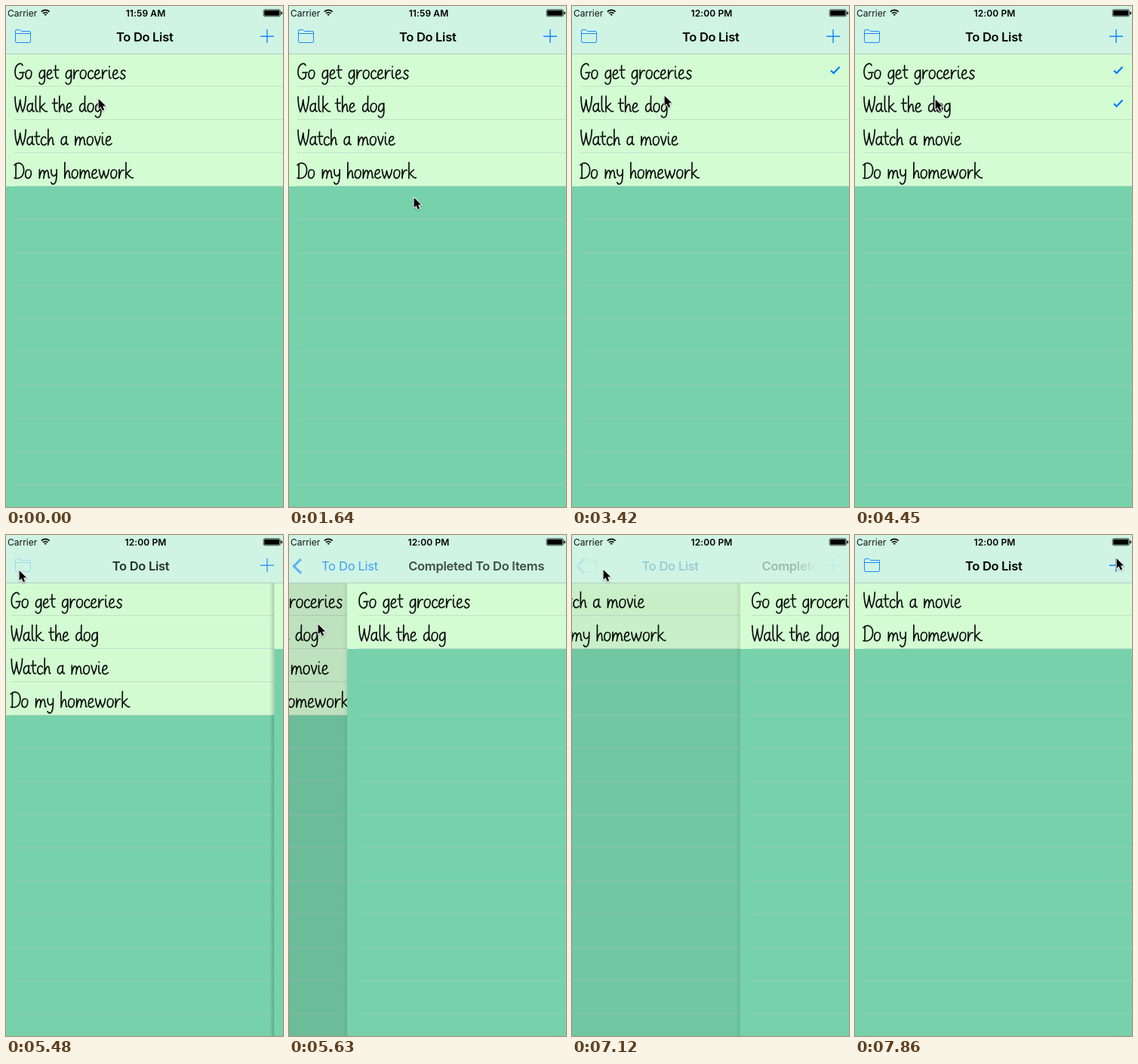
Animation of 367x664 px, one loop 8000 ms. Source, as an HTML page with a canvas:

```html
<!DOCTYPE html>
<html lang="en">
<head>
<meta charset="utf-8">
<title>To Do List</title>
<style>
html, body { margin: 0; width: 100%; height: 100%; overflow: hidden; background: #77d2ab; }
canvas { display: block; width: 367px; height: 664px; }
</style>
</head>
<body>
<canvas id="stage"></canvas>
<script>
const W = 367, H = 664, LOOP = 8000, STEP = LOOP / 54;
const ROW = 44, TOP = 63, SCREEN = 375, LEFT = -4;
const BLUE = '#007aff', GREEN = '#77d2ab', PALE = '#d3fcd3', BAR = '#cff4e4';

const canvas = document.getElementById('stage');
const ctx = canvas.getContext('2d');
const dpr = window.devicePixelRatio || 1;
canvas.width = W * dpr;
canvas.height = H * dpr;

// Handwriting: [advance, pen path], baseline at 0.
const bowl = 'M7.6-9.8C5.5-13 1-9.5 1-4.8S4.5 2 7.6-5';
const stem = 'M1.6-11.5L1.5 0';
const caps = {
  G: [14, 'M11-17.5C9-23 1-19 1-9S8 3 11.2-3L11.4-8M7-8L13.2-8.3'],
  W: [16, 'M1-20C1-13 2-5 4.2 0C6-5 7.4-11 7.8-16C8.1-10 9.3-4 11.1 0C13.8-6 15-12 15.3-20.5'],
  D: [13.6, 'M2.2-19.5L2 0M0-17.5C5-22.5 12.6-20 12.6-11S7 1.5 0-.3']
};
const round = {
  a: [10.5, bowl + 'L8-11.5C7.3-5 7.5 1 10.2-1'],
  c: [8.7, 'M7.3-9.2C6-13 1-10 1-5S5 1.8 8.2-2'],
  d: [10.5, bowl + 'L8-21C7.6-8 7.6 1 10-1'],
  e: [9.5, 'M1.2-5C5-5 7.8-8 6.8-10.3S2-12 1.2-6S4 2 8.6-2'],
  g: [10, bowl + 'L8-11.5C8.2-4 8.8 2 7.2 5S2 8.5 .8 5'],
  o: [10.3, 'M5.2-11.3C2-11.5 1-8 1-5S2.5 0 4.7 0S8.7-3 8.7-7S7.2-11.2 5.2-11.3']
};
const tall = {
  h: [10, 'M1.6-21L1.5 0C2-6 5-12 6.9-9.5S6.6 1 9.3-1'],
  i: [5.4, 'M1.7-11.3C1.4-6 1.3 1 4.2-1M2-16.3L1.9-15.6'],
  k: [10.2, 'M1.7-21L1.5 0M8-11.3L2-5.6C5.5-6.5 6 .5 11-.6'],
  l: [5.6, 'M1.8-21C1.6-10 1 1 4.4-.6'],
  t: [7.7, 'M2.8-17.5C2.6-9 1.8 1.5 6.5-1M0-11.3L6.8-11.6']
};
const arch = {
  m: [16, stem + 'C2-6 5-13 7.1-9.5S7-2 7 0C7.6-6 10.5-13 12.5-9.5S12.3 1 15-1'],
  r: [8.8, stem + 'C2-6 4-12 8-10.6'],
  s: [10, 'M7.8-10C5-13 1-9.5 3-7.2S9-4 7-1.3S2 .8 1-2'],
  v: [9, 'M.8-11.5L4.2 0C6-4 7.6-8 7.8-11.5'],
  w: [15.4, 'M.8-11.5C1.3-7 2.4-3 4 0C6-4 6.8-7 7-10C7.4-6 8.6-3 10 0C12.5-4 13.6-8 13.8-11.5'],
  y: [9.6, 'M1-11.5C.5-2 5-1 8-6M8.2-11.5C8.4-4 8.4 2 6.6 5.5S2 8 .9 5.5']
};
const glyphs = {};
for (const [ch, [adv, d]] of Object.entries({ ...caps, ...round, ...tall, ...arch })) {
  glyphs[ch] = { adv: adv + .1, pen: new Path2D(d) };
}

const icon = {
  folder: new Path2D('M12.5 46V33Q12.5 31.5 14 31.5H18.5L20.5 33.5H31Q32.5 33.5 32.5 35V46Q32.5 48.5 31 48.5H14Q12.5 48.5 12.5 46ZM12.5 36.5H32.5'),
  plus: new Path2D('M337 40.2H355M346 31V49'),
  chevron: new Path2D('M16 32L6.3 41.3L16 50.6'),
  check: new Path2D('M343 85.5L346.6 89L354.5 80.8'),
  arrow: new Path2D('M0 0V13.2L3 10.4L5.2 15.4L7.6 14.4L5.5 9.6H9.6Z')
};

const tasks = ['Go get groceries', 'Walk the dog', 'Watch a movie', 'Do my homework'];
const done = tasks.slice(0, 2), open = tasks.slice(2);

// Pointer stops: [step, x, y].
const route = [
  [0, 123, 123], [2, 87, 86], [5, 87, 86], [9, 176, 240], [11, 166, 254],
  [13, 145, 116], [16, 119, 90], [21, 119, 90], [23, 123, 119], [24, 123, 120],
  [25, 123, 120], [27, 128, 148], [29, 128, 148], [33, 44, 51], [34, 18, 47],
  [37, 18, 47], [40, 81, 261], [41, 82, 291], [43, 82, 291], [45, 42, 46],
  [48, 42, 46], [50, 190, 40], [52, 338, 27], [53, 347, 31]
];

function pointerAt(s) {
  const n = route.findIndex(p => p[0] >= s);
  if (n < 1) return route[0].slice(1);
  const [s0, x0, y0] = route[n - 1], [s1, x1, y1] = route[n];
  const k = (s - s0) / (s1 - s0);
  return [x0 + (x1 - x0) * k, y0 + (y1 - y0) * k];
}

// Critically damped page slide, 0 to 1.
function slide(s, start) {
  const x = Math.max(0, (s - start) * 2.57);
  const p = 1 - Math.exp(-x) * (1 + x);
  return p > .999 ? 1 : p;
}

function box(x, y, w, h, color) {
  ctx.fillStyle = color;
  ctx.fillRect(x, y, w, h);
}

function stroke(path, color, width, alpha = 1) {
  ctx.globalAlpha = alpha;
  ctx.strokeStyle = color;
  ctx.lineWidth = width;
  ctx.stroke(path);
  ctx.globalAlpha = 1;
}

function label(str, x, y, size, weight, color, align = 'left', alpha = 1, spacing = 0) {
  ctx.globalAlpha = alpha;
  ctx.font = `${weight} ${size}px Inter, Roboto, sans-serif`;
  ctx.letterSpacing = spacing + 'px';
  ctx.textAlign = align;
  ctx.fillStyle = color;
  ctx.fillText(str, x, y);
  ctx.globalAlpha = 1;
}

function write(str, x, y) {
  ctx.save();
  ctx.translate(x, y);
  ctx.lineCap = ctx.lineJoin = 'round';
  for (const ch of str) {
    const g = glyphs[ch];
    if (g) stroke(g.pen, '#0a0f0b', 1.7);
    ctx.translate(g ? g.adv : 7.7, 0);
  }
  ctx.restore();
}

function page(left, rows, checks = 0, glow = []) {
  ctx.save();
  ctx.translate(left - LEFT, 0);
  box(LEFT, TOP, SCREEN, H - TOP, GREEN);
  box(LEFT, TOP, SCREEN, ROW * rows.length, PALE);
  rows.forEach((str, i) => {
    const y = TOP + ROW * i;
    if (glow[i]) box(LEFT, y, SCREEN, ROW, `rgba(217,217,217,${glow[i]})`);
    write(str, 11, y + 33.3);
    if (i < checks) {
      ctx.save();
      ctx.translate(0, ROW * i);
      stroke(icon.check, BLUE, 2.2);
      ctx.restore();
    }
  });
  for (let y = TOP + ROW - 1, i = 1; y < H; y += ROW, i++) {
    box(11, y, SCREEN - 15, 1, i <= rows.length ? '#c6dfca' : '#9acbb7');
  }
  ctx.restore();
}

function statusBar(clock) {
  label('Carrier', 2, 13.5, 12, 400, '#111');
  label(clock, 185, 13.5, 12, 600, '#000', 'center', 1, .1);
  ctx.strokeStyle = ctx.fillStyle = '#000';
  ctx.lineWidth = 1.7;
  for (const r of [4.5, 7.6]) {
    ctx.beginPath();
    ctx.arc(52.2, 13, r, -Math.PI * .75, -Math.PI * .25);
    ctx.stroke();
  }
  ctx.beginPath();
  ctx.moveTo(52.2, 13);
  ctx.arc(52.2, 13, 2.3, -Math.PI * .75, -Math.PI * .25);
  ctx.fill();
  ctx.lineWidth = .7;
  ctx.beginPath();
  ctx.roundRect(341.2, 4.8, 22.2, 9, 1.8);
  ctx.stroke();
  ctx.beginPath();
  ctx.roundRect(342.2, 5.8, 20.2, 7, 1);
  ctx.roundRect(364.4, 7.6, 1.6, 3.6, .8);
  ctx.fill();
}

// q: 0 on the main list, 1 on the completed list.
function navBar(q, folderAlpha, backAlpha) {
  const old = (1 - q) ** 5, fresh = q ** 1.5;
  const shift = -122 * (q + .47 * q * q * (1 - q));
  const bold = [16.5, 600], y = 47;
  box(0, 0, W, TOP, BAR);
  box(0, TOP, W, 1, '#aecfbf');
  stroke(icon.folder, '#1789fc', 1, old * folderAlpha);
  stroke(icon.plus, '#1285fc', 1.4, old);
  label('To Do List', 183.7 + shift, y, ...bold, '#000', 'center', old, -.3);
  if (!q) return;
  ctx.lineCap = 'butt';
  stroke(icon.chevron, BLUE, 3, q ** 2.5 * backAlpha);
  label('To Do List', 183.7 + shift, y, 16.5, 400, BLUE, 'center', fresh * backAlpha, -.3);
  let ink = '#000';
  if (q < .75) {
    ink = ctx.createLinearGradient(292, 0, 326, 0);
    ink.addColorStop(0, 'rgba(0,0,0,1)');
    ink.addColorStop(1, 'rgba(0,0,0,0)');
  }
  label('Completed To Do Items', 106.3 + 240 * (1 - q), y, ...bold, ink, 'left', fresh, -.25);
}

function pages(s, q) {
  const main = s < 41 ? tasks : open;
  const checks = s < 22 || s >= 37 ? 0 : s < 29 ? 1 : 2;
  const glow = [[0, 1, .5][s - 20] || 0, [0, 1, .5][s - 27] || 0];
  const edge = LEFT + SCREEN * (1 - q);
  if (q < 1) page(LEFT - .3 * SCREEN * q, main, checks, glow);
  if (!q) return;
  if (q < 1) {
    box(0, TOP, edge, H - TOP, `rgba(0,0,0,${.13 * q})`);
    const shade = ctx.createLinearGradient(edge - 6, 0, edge, 0);
    const dark = .06 + .16 * (1 - q) ** 4;
    shade.addColorStop(0, 'rgba(0,0,0,0)');
    shade.addColorStop(1, `rgba(0,0,0,${dark})`);
    box(edge - 6, TOP, 6, H - TOP, shade);
  }
  page(edge, done);
}

function pointer(s) {
  const [x, y] = pointerAt(s);
  ctx.save();
  ctx.translate(x - .4, y);
  ctx.lineJoin = 'round';
  ctx.shadowColor = 'rgba(0,0,0,.3)';
  ctx.shadowBlur = 2 * dpr;
  ctx.shadowOffsetY = dpr;
  stroke(icon.arrow, '#fff', 1.9);
  ctx.shadowColor = 'transparent';
  ctx.fillStyle = '#000';
  ctx.fill(icon.arrow);
  ctx.restore();
}

function draw() {
  const t = performance.now() % LOOP;
  const s = Math.min(53, Math.floor((t + 4) / STEP));
  const q = s < 45 ? slide(s, 36.875) : 1 - slide(s, 47.206);
  ctx.setTransform(dpr, 0, 0, dpr, 0, 0);
  ctx.lineCap = 'butt';
  ctx.lineJoin = 'miter';
  pages(s, q);
  navBar(q, s >= 35 && s <= 38 ? .3 : 1, s === 47 ? .3 : 1);
  statusBar(s < 15 ? '11:59 AM' : '12:00 PM');
  pointer(s);
  requestAnimationFrame(draw);
}
requestAnimationFrame(draw);
</script>
</body>
</html>
```
